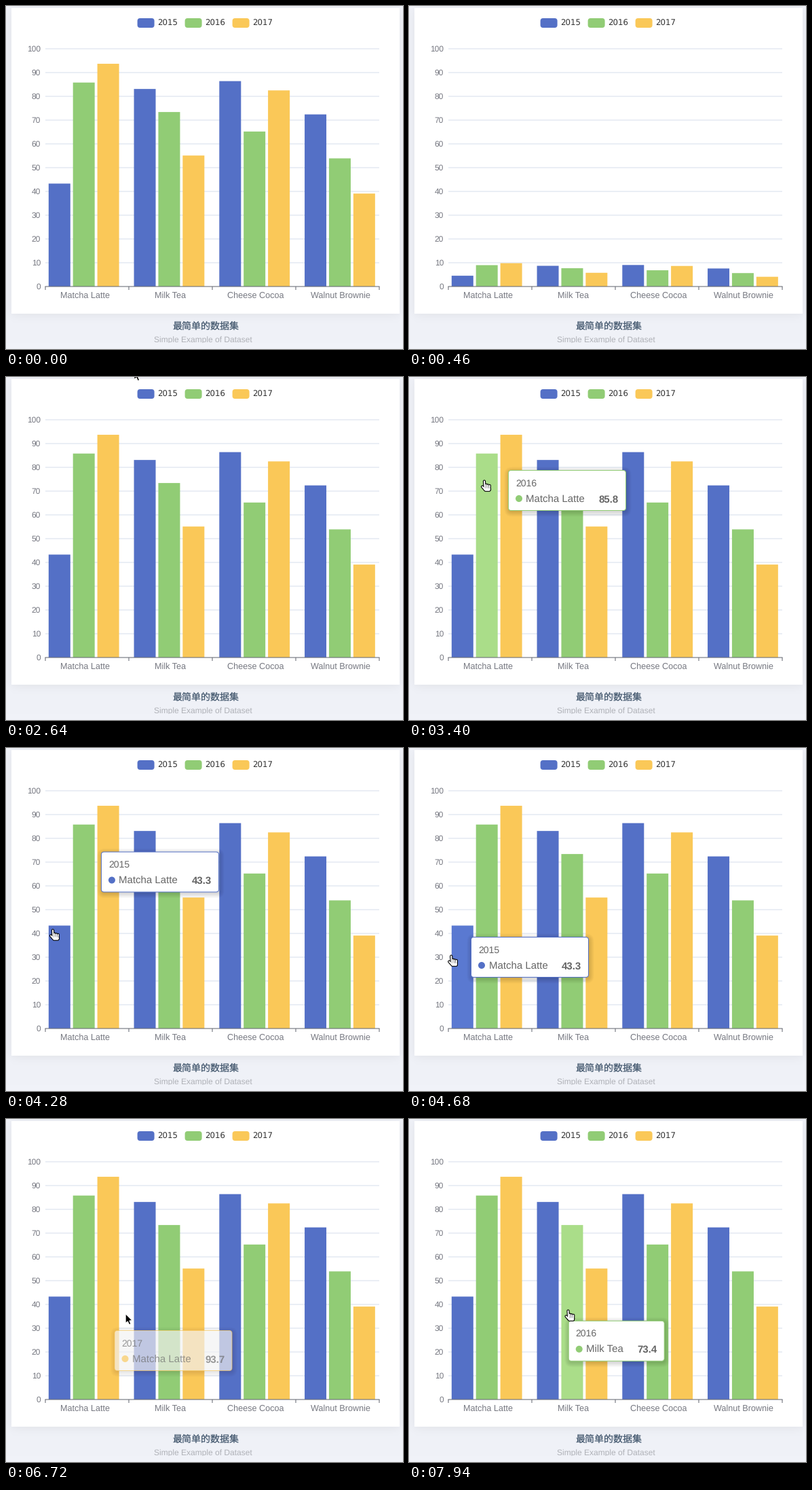
These frames come from a looping animation (585x505 px, 8 s). A matplotlib script:

```python
import numpy as np
import matplotlib.pyplot as plt
from matplotlib.animation import FuncAnimation
from matplotlib.colors import to_rgb
from matplotlib.patches import Circle, FancyBboxPatch, Polygon, Rectangle

W, H, DPI = 585, 505, 64          # 64 divides both sides exactly
LOOP, STEP = 8000, 40
PT = 72 / DPI                     # points per pixel
SANS, WIDE, CJK = "Liberation Sans", "DejaVu Sans", "Noto Sans CJK JP"

YEARS = ["2015", "2016", "2017"]
COLORS = ["#5470c6", "#91cc75", "#fac858"]
LIFTED = ["#5a79d1", "#aadd89", "#fed863"]
DRINKS = ["Matcha Latte", "Milk Tea", "Cheese Cocoa", "Walnut Brownie"]
VALUES = [43.3, 85.8, 93.7, 83.1, 73.4, 55.1, 86.4, 65.2, 82.5, 72.4, 53.9, 39.1]
BASE, UNIT = 413, 3.5
BAR_X, BAR_W, BAR_STEP, GROUP_STEP = 62.8, 32, 35.9, 125.75
PAGE, AXIS, BODY = "#f0f2f8", "#767881", "#666666"

# Pointer moves: start, end, where it enters a bar, where it rests
ENTRY_POINT = (196, -25)
MOVES = [
    (2620, 3310, (126.5, 117.5), (112, 152)),
    (4120, 4390, (71.5, 258.5), (63.2, 305)),
    (5150, 5390, (100, 298), (101, 298)),
    (5390, 5650, (140, 291.5), (150, 290)),
    (6550, 7090, (182, 286), (197, 286)),
    (7650, 7780, (217.5, 276.7), (235.5, 281)),
]
ENTER_AT = .55                    # share of a move spent before the bar
HIDE_DELAY, FADE, GLIDE = 150, 200, 400
TIP_GAP = 20
ARROW = np.array([(0, 0), (0, 14), (3.2, 11.2), (5.4, 16), (7.8, 15), (5.7, 10.2), (10, 10)])

plt.rcParams["text.hinting"] = "none"
fig = plt.figure(figsize=(W / DPI, H / DPI), dpi=DPI)
ax = fig.add_axes([0, 0, 1, 1])


def clamp(v):
    return min(max(v, 0), 1)


def ease_out(v, power=4):
    return 1 - (1 - clamp(v)) ** power


def cubic_in_out(v):
    v = clamp(v)
    return 4 * v ** 3 if v < .5 else 1 - 4 * (1 - v) ** 3


def lerp(a, b, k):
    return np.array(a) + (np.array(b) - np.array(a)) * k


def label(x, y, text, px, color, font=SANS, **kw):
    return ax.text(x, y, text, fontsize=px * PT, color=color, family=font,
                   va="baseline", **kw)


def rect(x, y, w, h, color, **kw):
    return ax.add_patch(Rectangle((x, y), w, h, fc=color, lw=0, **kw))


def rounded(x, y, w, h, radius, **kw):
    style = f"round,pad=0,rounding_size={radius}"
    return ax.add_patch(FancyBboxPatch((x, y), w, h, boxstyle=style, **kw))


def line(xs, ys, color, px, z):
    ax.plot(xs, ys, color=color, lw=px * PT, zorder=z, solid_capstyle="butt", snap=False)


def soft_span(n, lo, hi, blur):
    p = np.arange(n) + .5
    return (np.tanh((p - lo) / blur) - np.tanh((p - hi) / blur)) / 2


def draw_page():
    shade = np.outer(soft_span(H, 5, 455, 9), soft_span(W, 8, 580, 9))
    page = np.array(to_rgb(PAGE)) * (1 - .07 * shade[..., None])
    ax.imshow(page, extent=(0, W, H, 0), aspect="auto", interpolation="nearest", zorder=0)
    rect(8, 3, 572, 450, "white", zorder=1)
    label(294, 476, "最简单的数据集", 14, "#465a70", CJK, ha="center")
    label(218, 496, "Simple Example of Dataset", 12, "#b0b2b8")
    rect(0, 496, W, 9, PAGE, zorder=5)


def draw_axes():
    for value in range(0, 101, 10):
        y = BASE - UNIT * value
        if value:
            line([58, 550], [y, y], "#e2e7f1", 1.4, 2)
        label(51, y + 4.3, str(value), 12, AXIS, ha="right")
    line([57.5, 550.5], [BASE, BASE], "#6e7079", 1.1, 4)
    for k in range(5):
        line([58 + 123 * k] * 2, [BASE, BASE + 5], "#6e7079", 1.1, 4)
    for k, drink in enumerate(DRINKS):
        label(116 + GROUP_STEP * k, 430, drink, 12.6, AXIS, ha="center")
    for k, year in enumerate(YEARS):
        rounded(193.6 + 70 * k, 18, 25, 14, 4, fc=COLORS[k], lw=0, zorder=3)
        label(223.5 + 70 * k, 29.3, year, 11.8, "#333333", WIDE)


def bar_left(i):
    return BAR_X + GROUP_STEP * (i // 3) + BAR_STEP * (i % 3)


def bar_at(x, y):
    return next(i for i, value in enumerate(VALUES)
                if 0 <= x - bar_left(i) <= BAR_W and BASE - UNIT * value <= y <= BASE)


def enter_time(move):
    return move[0] + ENTER_AT * (move[1] - move[0])


def leave_time(index):
    return MOVES[index + 1][0] if index + 1 < len(MOVES) else LOOP


def pointer(t):
    spot = ENTRY_POINT
    for move in MOVES:
        start, end, entry, rest = move
        middle = enter_time(move)
        if t >= start:
            spot = lerp(spot, entry, ease_out((t - start) / (middle - start), 2))
        if t >= middle:
            spot = lerp(entry, rest, ease_out((t - middle) / (end - middle), 2))
    return np.array(spot)


def hover_level(index, t):
    rise = ease_out((t - enter_time(MOVES[index])) / FADE, 3)
    return rise * (1 - ease_out((t - leave_time(index)) / FADE, 3))


def tooltip_state(t):
    index = max((i for i, move in enumerate(MOVES) if t >= enter_time(move)), default=0)
    start, _, entry, rest = MOVES[index]
    shown = enter_time(MOVES[index])
    before = MOVES[max(index - 1, 0)][2]
    spot = lerp(before, entry, ease_out((t - shown) / GLIDE)) + TIP_GAP
    was_open = index > 0 and shown <= start + HIDE_DELAY
    alpha = 1 if was_open else ease_out((t - shown) / FADE)
    alpha *= 1 - ease_out((t - leave_time(index) - HIDE_DELAY) / FADE)
    return *spot, bar_at(*rest), alpha


class Tooltip:
    def __init__(self):
        self.shadows = [rounded(0, 0, 1, 1, 4 + g, fc="black", lw=0, zorder=10)
                        for g in range(8)]
        self.box = rounded(0, 0, 1, 1, 4, fc="white", lw=PT, zorder=11)
        self.dot = ax.add_patch(Circle((0, 0), 5, lw=0, zorder=12))
        self.title = label(0, 0, "", 14, BODY, zorder=12)
        self.name = label(0, 0, "", 15, BODY, zorder=12)
        self.value = label(0, 0, "", 15, BODY, zorder=12, ha="right", weight="bold")
        self.parts = [self.box, self.dot, self.title, self.name, self.value]

    def update(self, x, y, bar, alpha):
        group, series = divmod(bar, 3)
        w, h = (173 if group == 0 else 141), 59
        for grow, shadow in enumerate(self.shadows):
            shadow.set_bounds(x + 1 - grow, y + 2 - grow, w + 2 * grow, h + 2 * grow)
            shadow.set_alpha(.02 * alpha)
        self.box.set_bounds(x, y, w, h)
        self.box.set_edgecolor(COLORS[series])
        self.dot.center = x + 15.5, y + 41.5
        self.dot.set_facecolor(COLORS[series])
        self.title.set_text(YEARS[series])
        self.title.set_position((x + 10.5, y + 23))
        self.name.set_text(DRINKS[group])
        self.name.set_position((x + 26, y + 47))
        self.value.set_text(str(VALUES[bar]))
        self.value.set_position((x + w - 10.5, y + 47))
        for part in self.parts:
            part.set_alpha(alpha)
        for part in self.shadows + self.parts:
            part.set_visible(alpha > .01)


def hand_strokes():
    fingers = [((2.6 * k, 1.5 + (k > 0) * (4.6 + .6 * k)), (2.3 * k + .6, 13))
               for k in range(4)]
    thumb = [((-3, 9.5), (.6, 13.5))]
    palm = [((.8 + .4 * k, 13 + .9 * k), (7.8 - .2 * k, 13 + .9 * k)) for k in range(3)]
    gap = (np.nan, np.nan)
    return np.array([p for a, b in fingers + thumb + palm for p in (a, b, gap)])


def update(frame):
    t = frame * STEP
    blank.set_visible(60 <= t < 170)
    growth = 1 if t < 60 else cubic_in_out((t - 143) / 1000)
    levels = np.zeros(len(VALUES))
    for index, move in enumerate(MOVES):
        bar = bar_at(*move[3])
        levels[bar] = max(levels[bar], hover_level(index, t))
    for i, bar in enumerate(bars):
        height = UNIT * VALUES[i] * growth
        bar.set_y(BASE - height)
        bar.set_height(height)
        bar.set_facecolor(lerp(to_rgb(COLORS[i % 3]), to_rgb(LIFTED[i % 3]), levels[i]))
    tooltip.update(*tooltip_state(t))

    spot = pointer(t)
    hovering = any(enter_time(m) <= t < leave_time(i) for i, m in enumerate(MOVES))
    arrow.set_xy(ARROW + spot)
    arrow.set_visible(not hovering)
    for layer in hand:
        layer.set_data(*(HAND + spot - (1, 0)).T)
        layer.set_visible(hovering)


HAND = hand_strokes()
draw_page()
draw_axes()
bars = [rect(bar_left(i), BASE, BAR_W, 0, COLORS[i % 3], zorder=3, snap=False)
        for i in range(len(VALUES))]
tooltip = Tooltip()
arrow = ax.add_patch(Polygon(ARROW, fc="black", ec="white", lw=PT, zorder=15))
hand = [ax.plot([], [], color=color, lw=width * PT, zorder=z, solid_capstyle="round")[0]
        for color, width, z in (("black", 4.2, 15), ("white", 2, 16))]
blank = rect(0, 0, W, 496, "white", zorder=20)
ax.set(xlim=(0, W), ylim=(H, 0))
ax.axis("off")

anim = FuncAnimation(fig, update, frames=LOOP // STEP, interval=STEP,
                     repeat=True, repeat_delay=0)
plt.show()
```
